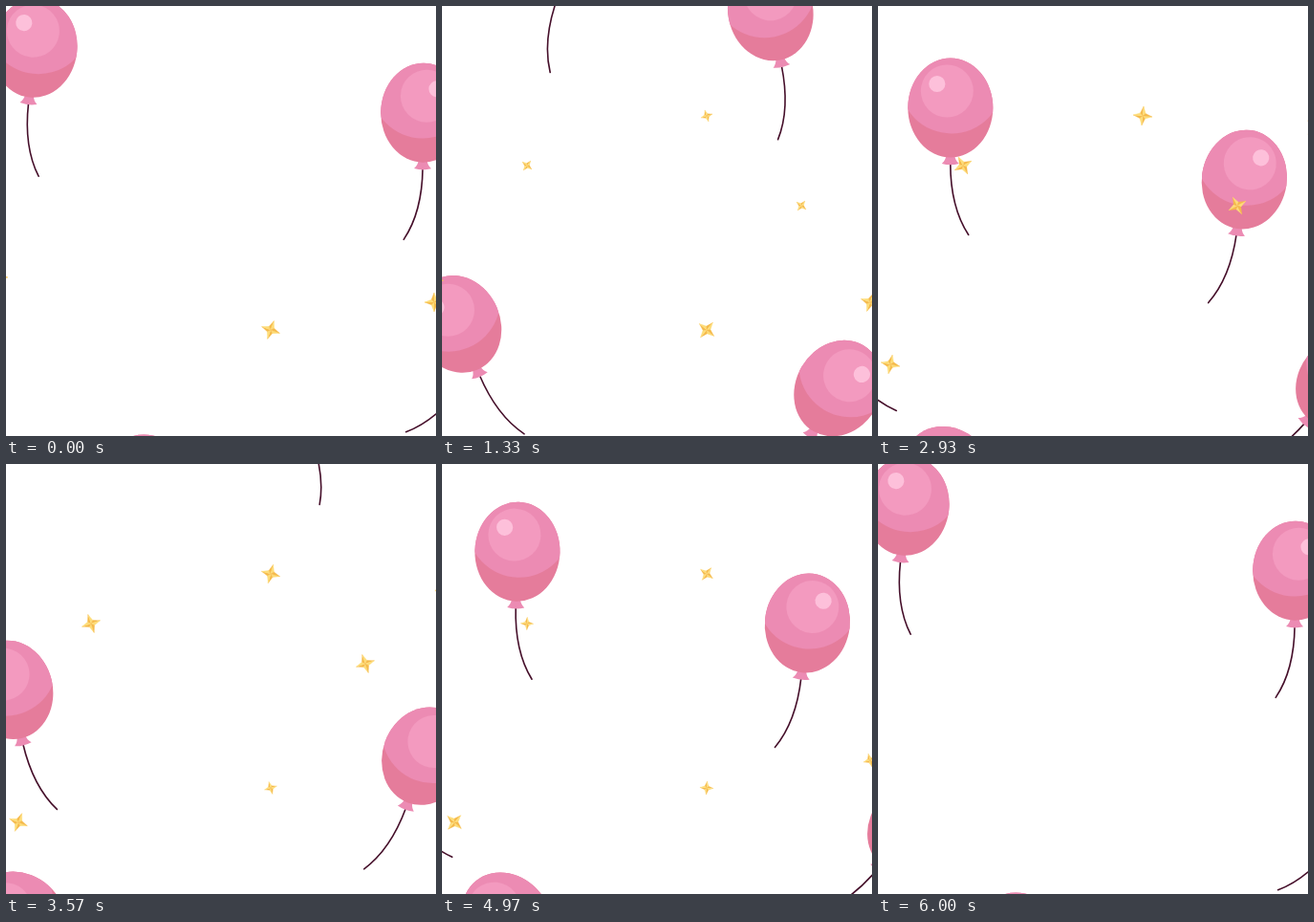
Write an HTML page with a canvas that moves like this. It is 450 by 450 pixels and loops after 6.03 s.

```html
<!DOCTYPE html>
<html lang="en">
<head>
<meta charset="utf-8">
<title>Balloons</title>
<style>
  html, body { margin: 0; width: 100%; height: 100%; overflow: hidden; background: #fff; }
  canvas { display: block; width: 100%; height: 100%; }
</style>
</head>
<body>
<canvas id="stage" width="450" height="450"></canvas>
<script>
const ctx = document.getElementById('stage').getContext('2d');
const SIZE = 450, LOOP = 6030, CYCLE = 2000;
const FPS = 0.03, STEPS = 180;   // steps per ms, steps per loop
const LAG = 167;                 // the right side trails the left one
const LEAN = 11;                 // balloon tilt against its arm, degrees

// Every balloon rides on a turning arm: pivot, radius,
// degrees per second, and the moment the arm is level
const arms = [
  { x: 448, y: 108, r: 561, speed: 48, level: 1403 },
  { x: 518, y: 79, r: 640, speed: 44, level: 2434 },
  { x: 574, y: 214, r: 570, speed: 42, level: 1620 },
  { x: 596, y: 208, r: 530, speed: 49, level: 708 }
];

// A star shines from start to pause, rests, then shines again until end
const RAMP = 400, SPIN = 0.015;
const early = { start: -600, pause: 1900, end: 5250 };
const mid = { start: 1080, pause: 4200, end: 5900 };
const late = { start: 1500, pause: 4200, end: 5950 };
const stars = [
  { x: 277, y: 339, turn: 20, wave: early, rest: 1400 },
  { x: 448, y: 310, turn: 0, wave: early, rest: 2000 },
  { x: -8, y: 284, turn: 0, wave: early, rest: 2000 },
  { x: 277, y: 115, turn: -38, wave: mid, rest: 450 },
  { x: 89, y: 167, turn: 18, wave: mid, rest: 500 },
  { x: 376, y: 209, turn: 18, wave: mid, rest: 800 },
  { x: 13, y: 375, turn: -32, wave: late, rest: 375 },
  { x: 457, y: 127, turn: 0, wave: late, rest: 800 }
];

const mod = (a, b) => ((a % b) + b) % b;
const rad = deg => deg * Math.PI / 180;

function oval(x, y, rx, ry) {
  ctx.beginPath();
  ctx.ellipse(x, y, rx, ry, 0, 0, 2 * Math.PI);
}

function disc(x, y, r, color) {
  oval(x, y, r, r);
  ctx.fillStyle = color;
  ctx.fill();
}

function balloon(x, y, tilt) {
  ctx.save();
  ctx.translate(x, y);
  ctx.rotate(-rad(tilt));

  ctx.beginPath();
  ctx.moveTo(0, 58);
  ctx.quadraticCurveTo(0, 104, 19, 133);
  ctx.strokeStyle = '#450f2a';
  ctx.lineWidth = 1.6;
  ctx.lineCap = 'round';
  ctx.stroke();

  ctx.beginPath();
  ctx.moveTo(-4.5, 50);
  ctx.quadraticCurveTo(-5, 55, -9, 58.5);
  ctx.quadraticCurveTo(0, 61, 9, 58.5);
  ctx.quadraticCurveTo(5, 55, 4.5, 50);
  ctx.fillStyle = '#ec8bb3';
  ctx.fill();

  oval(0, 0, 44.5, 52);
  ctx.fillStyle = '#e57c9b';
  ctx.fill();
  ctx.clip();
  disc(1, -27, 54, '#ec8bb3');
  disc(-3.5, -17.5, 27.5, '#f39abf');
  disc(-14, -25, 8.6, '#fdc0da');
  ctx.restore();
}

function side(t) {
  const phase = mod(t, CYCLE);
  for (const arm of arms) {
    for (let turn = -1; turn <= 1; turn++) {
      const deg = arm.speed * (arm.level - phase + turn * CYCLE) / 1000;
      if (Math.abs(deg) > 50) continue;
      const a = rad(deg);
      balloon(arm.x - arm.r * Math.cos(a), arm.y + arm.r * Math.sin(a), deg + LEAN);
    }
  }
}

function glow(t, from, to) {
  return Math.max(0, Math.min(1, (t - from) / RAMP, (to - t) / RAMP));
}

function star({ x, y, turn, wave, rest }, t) {
  const k = glow(t, wave.start, wave.pause) + glow(t, wave.pause + rest, wave.end);
  if (!k) return;
  ctx.save();
  ctx.translate(x, y);
  ctx.rotate(rad(turn + SPIN * t));
  ctx.scale(k, k);
  for (let i = 0; i < 8; i++) {
    const tip = Math.ceil(i / 2) * Math.PI / 2;
    const dent = (Math.floor(i / 2) + 0.5) * Math.PI / 2;
    ctx.beginPath();
    ctx.moveTo(0, 0);
    ctx.lineTo(10 * Math.cos(tip), 10 * Math.sin(tip));
    ctx.lineTo(4 * Math.cos(dent), 4 * Math.sin(dent));
    ctx.closePath();
    ctx.fillStyle = ctx.strokeStyle = i % 2 ? '#f5ba4a' : '#fddd78';
    ctx.lineWidth = 0.3;
    ctx.fill();
    ctx.stroke();
  }
  ctx.restore();
}

function draw(ms) {
  const step = Math.floor((ms % LOOP + 5) * FPS);
  const t = Math.max(1, step % STEPS) / FPS;   // the first pose is held
  ctx.fillStyle = '#fff';
  ctx.fillRect(0, 0, SIZE, SIZE);
  side(t);
  ctx.save();
  ctx.translate(SIZE, 0);
  ctx.scale(-1, 1);
  side(t - LAG);
  ctx.restore();
  for (const s of stars) star(s, step / FPS);
}

let origin;
function tick(now) {
  if (origin === undefined) origin = now;
  draw(Math.max(0, now - origin));
  requestAnimationFrame(tick);
}
draw(0);
requestAnimationFrame(tick);
</script>
</body>
</html>
```
